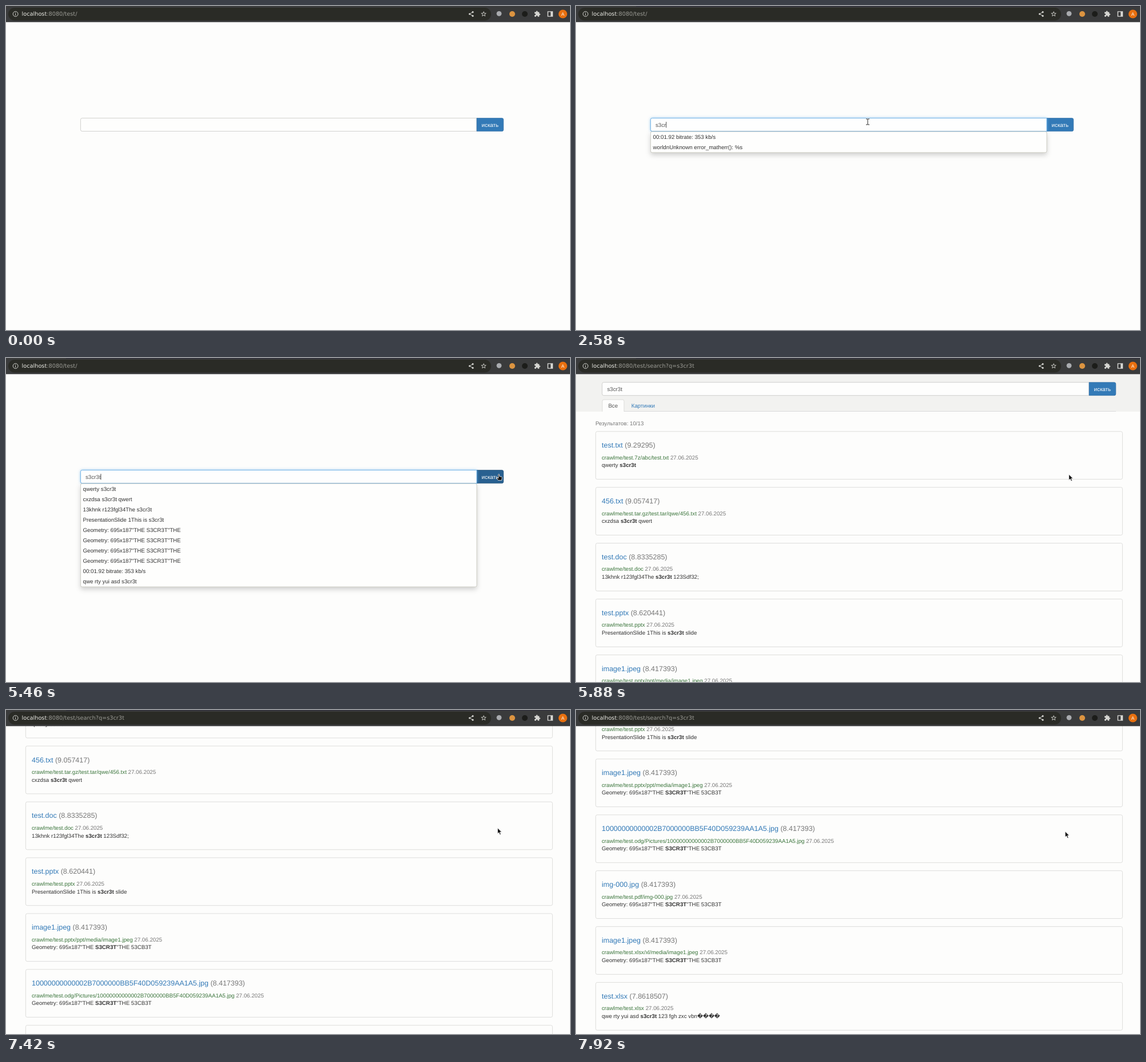
An HTML page that plays this animation: 986 px wide and 568 px high, repeating every 8 s.

```html
<!DOCTYPE html>
<html lang="ru">
<head>
<meta charset="utf-8">
<title>Search</title>
<style>
html, body { margin: 0; width: 100%; height: 100%; overflow: hidden; background: #fdfdfc; }
svg { display: block; }
text { font: 9.72px "Liberation Sans", "DejaVu Sans", sans-serif; fill: #333; text-rendering: geometricPrecision; white-space: pre; }
.title { font-size: 12.49px; }
.url { font-family: "DejaVu Sans", sans-serif; fill: #9c9c96; }
.host { fill: #ecece6; }
.blue { fill: #337ab7; }
.green { fill: #3c763d; }
.gray { fill: #777; }
.typed { fill: #555; }
.white { fill: #fff; }
.bold { font-weight: bold; }
.box { fill: #fdfdfc; stroke: #d6d6d4; stroke-width: .8; }
.field { fill: #fefefd; stroke: #c4c4c2; stroke-width: .8; }
.button { fill: #337ab7; stroke: #2e6da4; stroke-width: .7; }
.hover { fill: #286090; stroke: #204d74; }
#glow { fill: #fefefe; stroke: #66afe9; stroke-width: .9; filter: drop-shadow(0 0 2.8px rgba(102,175,233,.6)); }
#menuBox { fill: #fefefd; stroke: #c2c2b6; stroke-width: .8; filter: drop-shadow(0 4.2px 4.1px rgba(0,0,0,.18)); }
.icon { fill: #d6d6d2; }
.line { fill: none; stroke: #d6d6d2; }
.pointer { fill: #111; stroke: #fff; stroke-width: .8; stroke-linejoin: round; }
</style>
</head>
<body>
<svg id="stage" width="986" height="568" viewBox="0 0 986 568"></svg>
<script>
const R = 2.8, ROW = 18.04, PITCH = 97.92, LOOP = 8000;
const GEO = 'Geometry: 695x187"THE S3CR3T"THE';

const text = (x, y, s, cls = '', attrs = '') => `<text x="${x}" y="${y}" class="${cls}" ${attrs}>${s}</text>`;
const span = (cls, s) => `<tspan class="${cls}">${s}</tspan>`;
const leftRound = (x, y, w, h) =>
  `M${x + w} ${y}H${x + R}a${R} ${R} 0 0 0 ${-R} ${R}v${h - 2 * R}a${R} ${R} 0 0 0 ${R} ${R}H${x + w}z`;
const rightRound = (x, y, w, h) =>
  `M${x} ${y}h${w - R}a${R} ${R} 0 0 1 ${R} ${R}v${h - 2 * R}a${R} ${R} 0 0 1 ${-R} ${R}H${x}z`;
const searchBar = (x, y, w, id) => `
  <path class="field" d="${leftRound(x, y, w, 23)}"/>
  <path class="button" id="${id}" d="${rightRound(x + w, y, 46.7, 23)}"/>
  ${text(x + w + 8.6, y + 14.9, 'искать', 'white')}`;

const suggestions = [
  'qwerty s3cr3t', 'cxzdsa s3cr3t qwert', '13khnk r123fgl34The s3cr3t', 'PresentationSlide 1This is s3cr3t',
  GEO, GEO, GEO, GEO, '00:01.92 bitrate: 353 kb/s', 'qwe rty yui asd s3cr3t'
];
const firstSuggestions = [suggestions[8], 'worldnUnknown error_matherr(): %s'];

const longName = '10000000000002B7000000BB5F40D059239AA1A5.jpg';
const geoBody = GEO + ' 53CB3T';
const results = [
  ['test.txt', '9.29295', 'test.7z/abc/test.txt', 'qwerty s3cr3t'],
  ['456.txt', '9.057417', 'test.tar.gz/test.tar/qwe/456.txt', 'cxzdsa s3cr3t qwert'],
  ['test.doc', '8.8335285', 'test.doc', '13khnk r123fgl34The s3cr3t 123Sdf32;'],
  ['test.pptx', '8.620441', 'test.pptx', 'PresentationSlide 1This is s3cr3t slide'],
  ['image1.jpeg', '8.417393', 'test.pptx/ppt/media/image1.jpeg', geoBody],
  [longName, '8.417393', 'test.odg/Pictures/' + longName, geoBody],
  ['img-000.jpg', '8.417393', 'test.pdf/img-000.jpg', geoBody],
  ['image1.jpeg', '8.417393', 'test.xlsx/xl/media/image1.jpeg', geoBody],
  ['test.xlsx', '7.8618507', 'test.xlsx', 'qwe rty yui asd s3cr3t 123 fgh zxc vbn\uFFFD\uFFFD\uFFFD\uFFFD']
];
const card = ([name, score, path, body], i) => `<g transform="translate(0 ${128.8 + i * PITCH})">
  <rect class="box" x="34.4" y="0" width="921" height="83.8" rx="${R}"/>
  ${text(45, 28.4, span('blue', name) + span('gray', ` (${score})`), 'title')}
  ${text(45, 48.8, span('green', 'crawlme/' + path) + span('gray', ' 27.06.2025'))}
  ${text(45, 62.6, body.replace(/s3cr3t/i, m => span('bold', m)))}</g>`;

const toolbar = `
  <rect width="986" height="28.3" fill="#3a3b3c"/>
  <rect id="topLine" x="105" width="881" height="1" fill="#2c2a38"/>
  <rect x="4" y="3" width="844" height="22.5" rx="11.2" fill="#2a2b26"/>
  <circle class="line" cx="16.6" cy="14" r="4.4"/>
  <path class="line" d="M16.6 13.3v3.2M16.6 11.3v1.1"/>
  ${text(27.6, 17.2, '', 'url', 'id="url"')}
  <path class="line" d="M816 10.8L810.5 14L816 17.2"/>
  <g class="icon"><circle cx="816" cy="10.7" r="1.6"/><circle cx="810.5" cy="14" r="1.6"/><circle cx="816" cy="17.3" r="1.6"/></g>
  <path class="icon" transform="translate(829.2 8) scale(.49)" d="M22 9.24l-7.19-.62L12 2 9.19 8.63 2 9.24l5.46 4.73L5.82 21 12 17.27 18.18 21l-1.63-7.03zM12 15.4l-3.76 2.27 1-4.28-3.32-2.88 4.38-.38L12 6.1l1.71 4.04 4.38.38-3.32 2.88 1 4.28z"/>
  <circle id="spinner" cx="862" cy="13.3" r="4.4" fill="#a9abaf"/>
  <circle cx="885" cy="14" r="5" fill="#dc9440"/>
  <circle cx="907" cy="14" r="5" fill="#1c1d1a"/>
  <path class="icon" transform="translate(923 8) scale(.49)" d="M20.5 11H19V7c0-1.1-.9-2-2-2h-4V3.5a2.5 2.5 0 0 0-5 0V5H4c-1.1 0-2 .9-2 2v3.8h1.5a2.7 2.7 0 0 1 0 5.4H2V20c0 1.1.9 2 2 2h3.8v-1.5a2.7 2.7 0 0 1 5.4 0V22H17c1.1 0 2-.9 2-2v-4h1.5a2.5 2.5 0 0 0 0-5z"/>
  <path class="icon" fill-rule="evenodd" d="M946.6 9.2h9.6v9.6h-9.6zM948 10.6v6.8h4.2v-6.8z"/>
  <circle cx="973.5" cy="14" r="7.6" fill="#e8700f"/>
  ${text(973.5, 16.9, 'A', 'white', 'text-anchor="middle" style="font-size:8px"')}`;

const $ = id => document.getElementById(id);
const show = (id, on) => $(id).style.display = on ? '' : 'none';

$('stage').innerHTML = `
  <rect width="986" height="568" fill="#fdfdfc"/>
  <g id="home">
    ${searchBar(130.4, 196.6, 692.6, 'go')}
    <path id="glow" d="${leftRound(130.4, 196.6, 692.6, 23)}"/>
    ${text(139, 211.5, '', 'typed', 'id="query"')}
    <rect id="caret" y="203" width=".8" height="10.4" fill="#222"/>
    <g id="menu"><rect id="menuBox" x="130.4" y="220.2" width="692.6" rx="${R}"/><g id="rows"></g></g>
  </g>
  <g id="results">
    <rect y="28" width="986" height="66" fill="#f2f2f0"/>
    ${searchBar(45.7, 42.7, 851.3, 'go2')}
    ${text(54.4, 57.5, 's3cr3t', 'typed')}
    <path d="M46 93.5H944" stroke="#d4d4d6" stroke-width=".8"/>
    <path class="box" d="M46 94V${73 + R}a${R} ${R} 0 0 1 ${R} ${-R}H${84 - R}a${R} ${R} 0 0 1 ${R} ${R}V94"/>
    ${text(56.4, 86.5, 'Все', 'typed')}
    ${text(96.8, 86.5, 'Картинки', 'blue')}
    ${text(34, 118.1, 'Результатов: 10/13', 'gray')}
    ${results.map(card).join('')}
  </g>
  ${toolbar}
  <g id="cursor">
    <path id="arrow" class="pointer" d="M0 0V10.2L2.4 8L4.1 11.9L5.9 11.1L4.2 7.3H7.3z"/>
    <g id="beam" fill="none"><path d="M-3 -5H3M0 -5V5M-3 5H3" stroke="#fff" stroke-width="2.4"/>
      <path d="M-3 -5H-.8L0 -4.4L.8 -5H3M0 -4.4V4.4M-3 5H-.8L0 4.4L.8 5H3" stroke="#222"/></g>
    <path id="hand" class="pointer" d="M-.9 0Q0 -1.2 .9 0V3.4L5 4.3Q5.8 4.6 5.7 5.6L5 10.4H-1.2L-3.8 6.6Q-3.6 5.2 -2.4 5.8L-.9 7z"/>
  </g>`;

const clamp = v => Math.max(0, Math.min(1, v));
const ease = v => (v = clamp(v)) * v * (3 - 2 * v);
const mix = (a, b, p) => a + (b - a) * p;

const keyTimes = [1540, 2000, 2330, 2580, 3420, 3750];
const urlStart = span('host', 'localhost') + ':8080/test/';
let shownMenu;

function setMenu(list) {
  if (list === shownMenu) return;
  shownMenu = list;
  $('menuBox').setAttribute('height', list.length * ROW + .6);
  $('rows').innerHTML = list.map((s, i) => text(134.5, 233 + i * ROW, s)).join('');
}

function pointerAt(t, step) {
  if (t < 4420) {
    const p = ease((t - 420) / 830);
    return [mix(560, 510, p), mix(352, 203, p)];
  }
  const p = ease((t - 4380) / 620), first = Math.min(step, 8) / 8, rest = Math.max(0, step - 8) / 4;
  return [mix(510, 861.6, p) - 4.5 * first - 2 * rest, mix(203, 204, p) + 5.6 * first + 3.2 * rest];
}

function draw() {
  const t = performance.now() % LOOP;
  const loaded = t >= 5580;
  show('home', !loaded);
  show('results', loaded);
  show('topLine', t >= 460);
  $('url').innerHTML = urlStart + (loaded ? 'search?q=s3cr3t' : '');

  $('glow').style.opacity = clamp((t - 1230) / 100);
  $('query').textContent = 's3cr3t'.slice(0, keyTimes.filter(k => t >= k).length);
  $('caret').setAttribute('x', 139 + $('query').getComputedTextLength());
  show('caret', t >= 1250 && !(t >= 3210 && t < 3420) && !(t >= 4420 && t < 4960));
  show('menu', t >= 2330);
  setMenu(t < 4210 ? firstSuggestions : suggestions);

  // The page scrolls in 12 even ticks, slower over the last four.
  const step = t < 7209 ? 0 : Math.min(12, Math.floor((t - 7209) / 64.5) + 1);
  const scroll = 327.2 * Math.min(step, 8) / 8 + 107.4 * Math.max(0, step - 8) / 4;
  $('results').setAttribute('transform', `translate(0 ${-scroll})`);

  const busy = loaded && t < 7130;
  $('spinner').setAttribute('cy', busy ? 14.3 + Math.sin((t - 6780) / 64) : 13.3);

  const [x, y] = pointerAt(t, step);
  const overButton = !loaded && x > 823;
  const overField = !loaded && !overButton && y < 220;
  $('cursor').setAttribute('transform', `translate(${x} ${y})`);
  show('cursor', t >= 460);
  show('hand', overButton);
  show('beam', overField);
  show('arrow', !overButton && !overField);
  $('go').classList.toggle('hover', overButton);
  requestAnimationFrame(draw);
}
draw();
</script>
</body>
</html>
```
